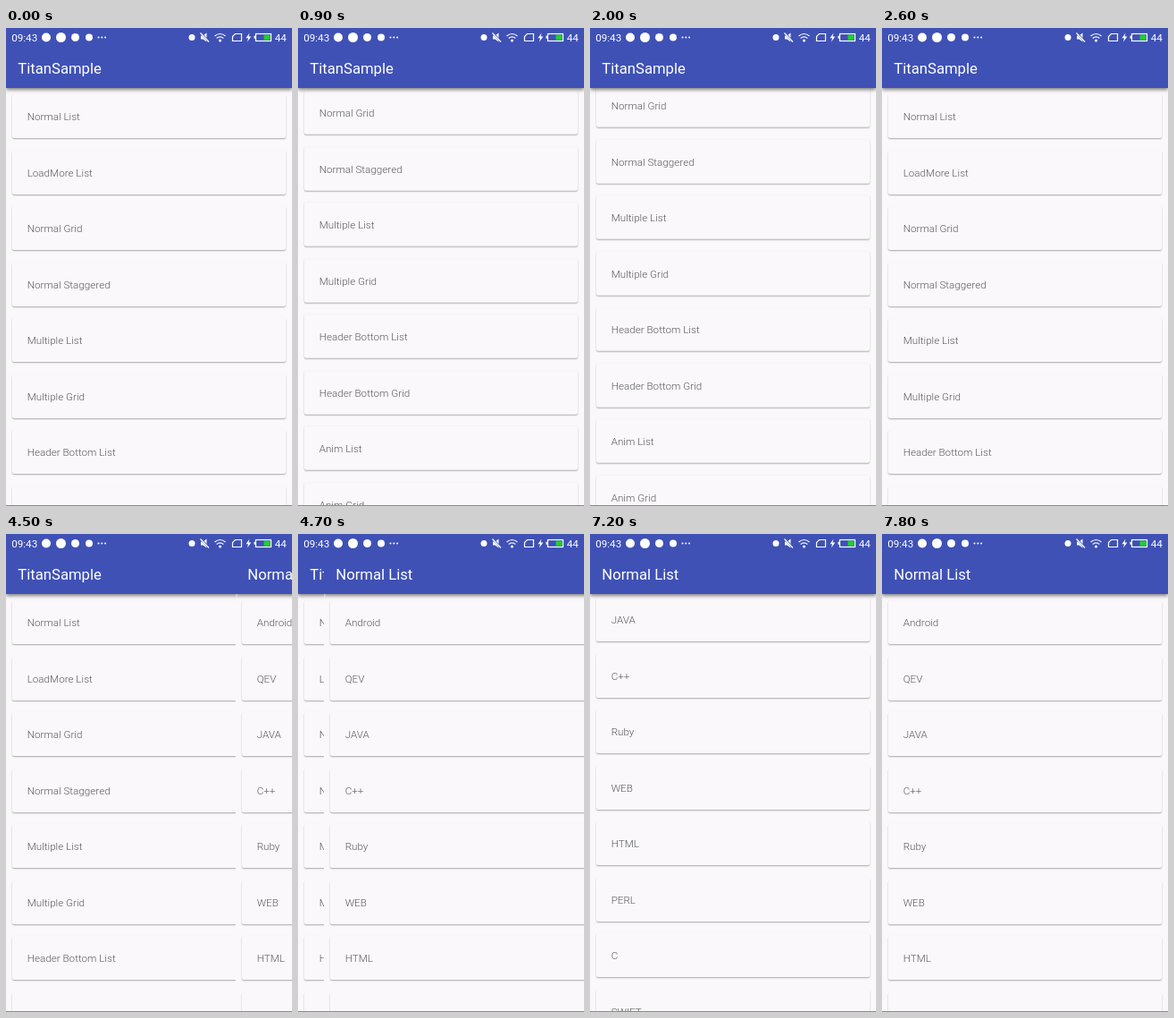
An HTML page that plays this animation: 320 px wide and 534 px high, repeating every 8000 ms.

```html
<!DOCTYPE html>
<html lang="en">
<head>
<meta charset="utf-8">
<title>List demo</title>
<style>
html, body { margin: 0; width: 100%; height: 100%; overflow: hidden; }
body { position: relative; font: 300 11.67px Roboto, sans-serif; }
.page { position: absolute; left: 0; top: 0; width: 320px; height: 534px; overflow: hidden; background: #faf8fb; }
.bar {
  position: absolute; top: 0; left: 0; width: 320px; height: 67px; background: #3f51b5;
  box-shadow: 0 1.5px 4px rgba(0, 0, 0, .5);
  color: #fff; font-size: 16.67px; font-weight: 400;
}
.bar span { position: absolute; left: 13.3px; top: 35px; line-height: 22px; white-space: nowrap; }
.card {
  position: absolute; left: 6.67px; width: 306.67px; height: 49px; box-sizing: border-box;
  padding-left: 17px; line-height: 51px; color: #5a5a5a; background: #faf8fb;
  border-radius: 2px; box-shadow: 0 1px 1.5px rgba(0, 0, 0, .32);
}
svg { position: absolute; left: 0; top: 0; }
</style>
</head>
<body>
<svg width="320" height="534" fill="#fff" style="z-index:1">
  <g font-weight="400">
    <text x="6.2" y="14.6">09:43</text>
    <text x="300.8" y="14.6">44</text>
  </g>
  <circle cx="45" cy="10.5" r="5"/>
  <circle cx="61.5" cy="10.5" r="5.5"/>
  <circle cx="77.5" cy="10.5" r="4.5"/>
  <circle cx="93" cy="10.5" r="4"/>
  <circle cx="103.5" cy="10.5" r="1"/>
  <circle cx="107.3" cy="10.5" r="1"/>
  <circle cx="111.1" cy="10.5" r="1"/>
  <circle cx="208" cy="10.5" r="3.5"/>
  <path d="M218 8.5h2.5l4-3v10l-4-3H218z"/>
  <path d="M218 5.5l9 10" stroke="#3f51b5" stroke-width="2.4"/>
  <g fill="none" stroke="#fff" stroke-width="1.2">
    <path d="M217.5 5.5l9.5 10M233.5 9q6-5 12 0M235.7 11.5q3.8-3.2 7.6 0M253.5 14.5v-5l3-3h7v8z"/>
    <rect x="279.5" y="6.5" width="17" height="8"/>
  </g>
  <circle cx="239.5" cy="14" r="1.5"/>
  <path d="M272.5 5.5l-4 5.7h2.5l-1 4.3 4.3-6h-2.8z"/>
  <path d="M277.5 8.7h1.5v3h-1.5z"/>
  <path d="M288.5 7.5h7v6h-7z" fill="#1fce35"/>
  <path d="M0 533h320v1H0z" fill="#8b898e"/>
</svg>
<script>
const PITCH = 62.5, TOP = 74, MENU_MAX = 284.5, LANG_MAX = 159.5;

function el(parent, cls, tag = 'div') {
  const e = document.createElement(tag);
  e.className = cls;
  return parent.appendChild(e);
}

function makePage(title, items) {
  const page = el(document.body, 'page');
  const list = el(page, '');
  items.forEach((text, i) => {
    const card = el(list, 'card');
    card.style.top = TOP + i * PITCH + 'px';
    card.textContent = text;
  });
  el(el(page, 'bar'), '', 'span').textContent = title;
  return { page, list };
}

const menu = makePage('TitanSample', [
  'Normal List', 'LoadMore List', 'Normal Grid', 'Normal Staggered',
  'Multiple List', 'Multiple Grid', 'Header Bottom List', 'Header Bottom Grid',
  'Anim List', 'Anim Grid', 'Single Select', 'Multiple Select'
]);
const langs = makePage('Normal List', [
  'Android', 'QEV', 'JAVA', 'C++', 'Ruby', 'WEB', 'HTML', 'PERL', 'C', 'SWIFT'
]);

// Decelerating progress from 0 to 1
function ease(t, start, length, power) {
  const u = Math.min(1, Math.max(0, (t - start) / length));
  return 1 - (1 - u) ** power;
}

const move = (e, x, y) => e.style.transform = `translate(${x}px, ${y}px)`;

function draw(now) {
  const t = Math.floor(now % 8000 / 100) * 100;
  const menuY = MENU_MAX * (ease(t, 700, 700, 1.8) - ease(t, 1700, 900, 1.8));
  const langY = LANG_MAX * (ease(t, 5700, 600, 3.86) - ease(t, 7100, 700, 1.43));
  move(menu.list, 0, -menuY);
  move(langs.list, 0, -langY);
  move(langs.page, Math.round(320 * (1 - ease(t, 4465, 335, 2))), 0);
  requestAnimationFrame(draw);
}
draw(performance.now());
</script>
</body>
</html>
```
